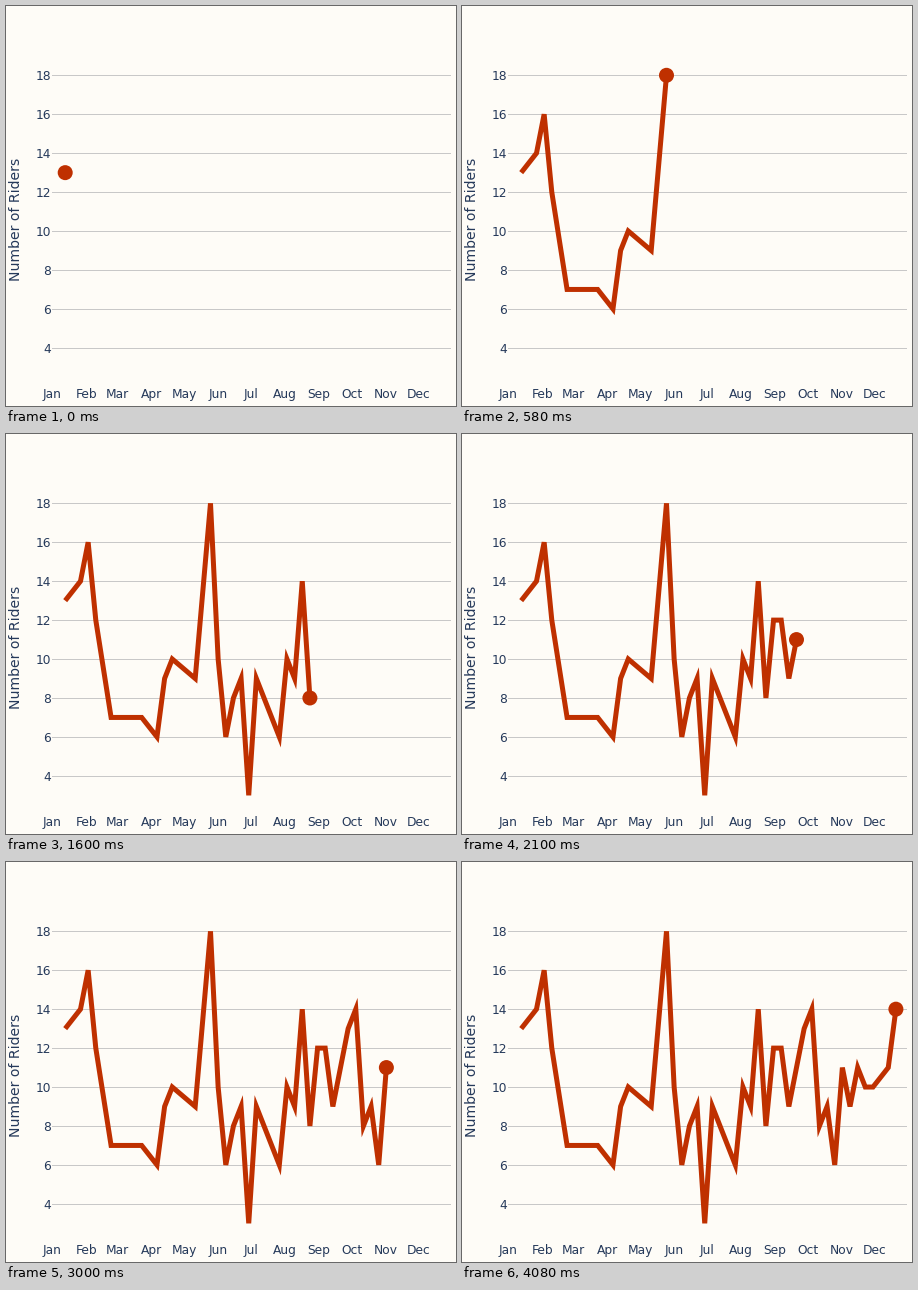
Animation of 450x400 px, one loop 4.28 s. Source, as a matplotlib script:

```python
import numpy as np
import matplotlib.pyplot as plt
from matplotlib.animation import FuncAnimation
from matplotlib.patches import Circle

W, H, DPI = 450, 400, 100
PX = 72 / DPI  # points per pixel
BG, GRID, INK, RED = "#fefcf7", "#c8c8c8", "#25395a", "#bf3000"
LOOP, TICK = 4280, 10
DAY = 7.647 / 7  # pixels per day

plt.rcParams["font.family"] = "DejaVu Sans"

# Riders on each outing; no outing in the idle weeks.
RIDERS = np.array([13, 14, 16, 12, 7, 7, 7, 6, 9, 10, 9, 18, 10, 6, 8, 9, 3,
                   9, 8, 6, 10, 9, 14, 8, 12, 12, 9, 11, 13, 14, 8, 9, 6, 11,
                   9, 11, 10, 10, 11, 14])
IDLE = [1, 5, 7, 9, 11, 15, 16, 18, 27, 47]
weeks = np.setdiff1d(np.arange(50), IDLE)


def y_px(riders):
    return 69.3 + (18 - riders) * 19.468


xs = 59.2 + weeks * 7 * DAY
ys = y_px(RIDERS)

# Each step holds a little longer; the first three linger.
holds = (np.arange(len(weeks)) + 1) // 2 * 10
holds[holds <= 10] = 100
starts = np.cumsum(holds) - holds

fig = plt.figure(figsize=(W / DPI, H / DPI), dpi=DPI, facecolor=BG)
ax = fig.add_axes([0, 0, 1, 1])
ax.set_xlim(0, W)
ax.set_ylim(H, 0)
ax.axis("off")


def label(x, y, text, size=12.3, **kw):
    ax.text(x, y, text, fontsize=size * PX, color=INK, va="baseline", **kw)


for value in range(4, 19, 2):
    y = y_px(value)
    ax.plot([46, 444], [y, y], color=GRID, lw=PX, solid_capstyle="projecting")
    label(45, y + 4.7, str(value), ha="right")

months = np.arange("2024-01", "2025-01", dtype="datetime64[M]")
days = months.astype("datetime64[D]")
for date, day in zip(days, (days - days[0]).astype(int)):
    label(46.3 + day * DAY, 392, date.item().strftime("%b"), ha="center")

label(14, 213.5, "Number of Riders", 14, ha="center",
      rotation=90, rotation_mode="anchor")

trail, = ax.plot([], [], color=RED, lw=5 * PX, solid_capstyle="butt",
                 solid_joinstyle="miter", zorder=3)
dot = ax.add_patch(Circle((xs[0], ys[0]), 7.5, fc=RED, lw=0, zorder=4))


def draw(frame):
    n = np.searchsorted(starts, frame * TICK, side="right")
    trail.set_data(xs[:n], ys[:n])
    dot.center = xs[n - 1], ys[n - 1]
    return trail, dot


anim = FuncAnimation(fig, draw, frames=LOOP // TICK, interval=TICK,
                     repeat=True, repeat_delay=0)
plt.show()
```
